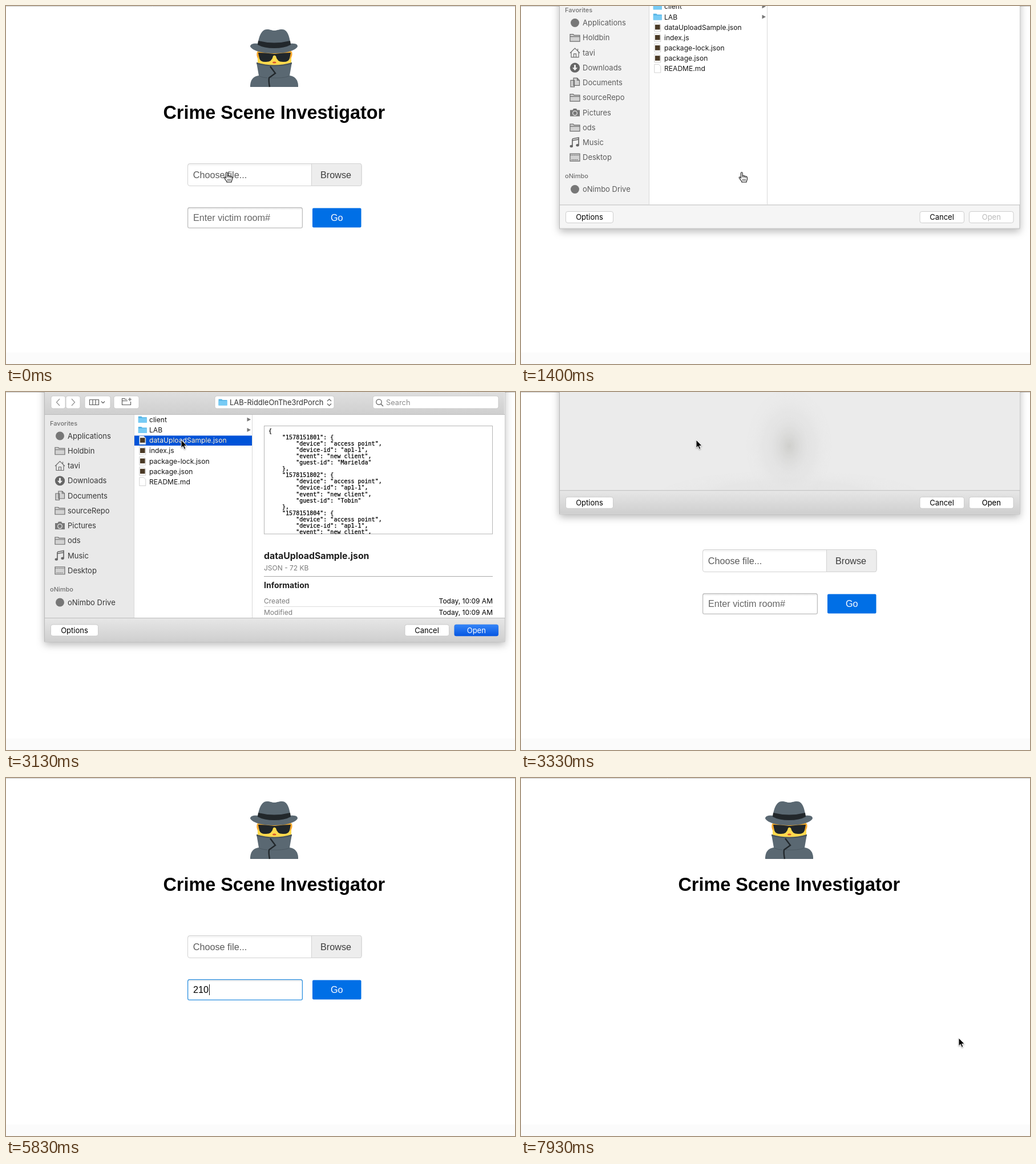
An HTML page for the animation above (8000 ms loop, 892 by 628 pixels).

```html
<!DOCTYPE html>
<html lang="en">
<head>
<meta charset="utf-8">
<title>Crime Scene Investigator</title>
<style>
html, body { margin: 0; width: 100%; height: 100%; overflow: hidden; background: #fff; }
svg { display: block; }
#stage { width: 100%; height: 100%; }
.page { font: 16.2px "Liberation Sans", Arial, sans-serif; }
.sheet { font: 13px Inter, Roboto, sans-serif; }
.sheet .file { font-size: 12.1px; }
.sheet .small { font-size: 11px; font-weight: 500; fill: #707070; }
.sheet .info { font-size: 12px; }
.sheet .head { font-weight: 700; fill: #1e1e1e; }
.sheet .grey { fill: #7b7b7b; }
.code { font: 10px "DejaVu Sans Mono", monospace; white-space: pre; stroke: #000; stroke-width: .25; }
.mid { text-anchor: middle; }
.end { text-anchor: end; }
.line { fill: none; stroke: #6c6c6c; stroke-width: 1.2; }
.pale { fill: #d2d2d2; }
.btn { fill: #fff; stroke: #c3c3c3; stroke-width: .8; }

/* one 8 s timeline: 1% = 80 ms */
.move { animation: 8s cubic-bezier(.364, 0, .636, 1) infinite; }
.flag { animation: 8s step-end infinite; opacity: 0; }

.sheet { animation-name: slide; }
@keyframes slide {
  0%, 13.57% { transform: translateY(-438px); visibility: hidden; }
  13.58% { transform: translateY(-438px); visibility: visible; }
  18.58%, 39.63% { transform: none; visibility: visible; }
  43.59% { transform: translateY(-438px); visibility: visible; }
  43.6%, 100% { transform: translateY(-438px); visibility: hidden; }
}
.still { animation-name: still; }
@keyframes still {
  0%, 39.63% { transform: translateY(0); }
  43.59%, 100% { transform: translateY(438px); }
}
.form { animation-name: fade; }
@keyframes fade { 0%, 83.1% { opacity: 1; } 88.1%, 100% { opacity: 0; } }
.field { animation-name: field; }
@keyframes field {
  0%, 51.25% { stroke: #bdbdbd; }
  53.4%, 60.38% { stroke: #d9252b; }
  62.9%, 76.6% { stroke: #2b8fe0; }
  78.4%, 100% { stroke: #bdbdbd; }
}
.cursor { animation-name: cursor; }
@keyframes cursor {
  0%, 26.25% { transform: translate(387px, 292.5px); }
  35.88%, 45.6% { transform: translate(307px, 84px); }
  51.1%, 73.25% { transform: translate(456px, 379px); }
  76.4%, 90.88% { transform: translate(577px, 372px); }
  98.6%, 100% { transform: translate(767px, 456px); }
}
.hand { animation-name: hand; }
@keyframes hand {
  0% { opacity: 1; } 19.5% { opacity: 0; }
  48.9% { opacity: 1; } 49.4% { opacity: 0; }
  75.2% { opacity: 1; } 88.75%, 100% { opacity: 0; }
}
.arrow { animation-name: arrow; }
@keyframes arrow {
  0% { opacity: 0; } 19.5% { opacity: 1; }
  48.9% { opacity: 0; } 49.4% { opacity: 1; } 50.1% { opacity: 0; }
  74.9% { opacity: 1; } 75.2% { opacity: 0; } 88.75%, 100% { opacity: 1; }
}
.beam { animation-name: beam; }
@keyframes beam {
  0% { opacity: 0; } 50.1% { opacity: 1; } 60.38% { opacity: 0; }
  73.25% { opacity: 1; } 74.9%, 100% { opacity: 0; }
}
.ring { animation-name: ring; }
@keyframes ring {
  0% { opacity: 0; } 3.75% { opacity: 1; } 10.38% { opacity: 0; }
  44% { opacity: 1; } 51.25%, 100% { opacity: 0; }
}
.hint { animation-name: hint; }
@keyframes hint { 0% { opacity: 1; } 60.38%, 100% { opacity: 0; } }
.key1 { animation-name: key1; }
@keyframes key1 { 0% { opacity: 0; } 60.38%, 100% { opacity: 1; } }
.key2 { animation-name: key2; }
@keyframes key2 { 0% { opacity: 0; } 65.37%, 100% { opacity: 1; } }
.key3 { animation-name: key3; }
@keyframes key3 { 0% { opacity: 0; } 67.12%, 100% { opacity: 1; } }
.caret { animation-name: caret; }
@keyframes caret {
  0% { opacity: 0; transform: none; }
  51.25% { opacity: 1; transform: none; }
  57.87% { opacity: 0; transform: none; }
  60.38% { opacity: 1; transform: translateX(9px); }
  65.37% { opacity: 1; transform: translateX(18px); }
  67.12% { opacity: 1; transform: translateX(27px); }
  73.37%, 100% { opacity: 0; transform: translateX(27px); }
}
.live { animation-name: live; }
@keyframes live { 0% { opacity: 0; } 19.5%, 100% { opacity: 1; } }
#side { animation: ink 8s step-end infinite; }
@keyframes ink { 0% { fill: #5c5c5c; } 19.5%, 100% { fill: #363636; } }
.pick { animation-name: pick; }
@keyframes pick { 0% { opacity: 0; } 37.12%, 100% { opacity: 1; } }
.preview { animation-name: preview; }
@keyframes preview { 0% { opacity: 0; } 37.87% { opacity: 1; } 39.6%, 100% { opacity: 0; } }
.blank { animation-name: blank; }
@keyframes blank { 0% { opacity: 0; } 39.6%, 100% { opacity: 1; } }
</style>
</head>
<body>
<svg id="stage" viewBox="0 0 892 628">
  <defs>
    <linearGradient id="bar" x2="0" y2="1"><stop stop-color="#e7e7e7"/><stop offset="1" stop-color="#cfcfcf"/></linearGradient>
    <linearGradient id="inset" x2="0" y2="1"><stop stop-color="#000" stop-opacity=".09"/><stop offset="1" stop-color="#000" stop-opacity="0"/></linearGradient>
    <linearGradient id="blue" x2="0" y2="1"><stop stop-color="#3585f7"/><stop offset="1" stop-color="#0657e2"/></linearGradient>
    <radialGradient id="core"><stop stop-color="#cfcfcc"/><stop offset="1" stop-color="#dcdcdc" stop-opacity="0"/></radialGradient>
    <radialGradient id="haze"><stop stop-color="#dedede"/><stop offset=".6" stop-color="#e3e3e3"/><stop offset="1" stop-color="#ebebeb" stop-opacity="0"/></radialGradient>
    <clipPath id="body"><path d="M68 0H874V396H68Z"/></clipPath>
    <clipPath id="box"><path d="M453 60H852V249H453Z"/></clipPath>
    <g id="folder"><path class="line pale" d="M-8.5-6H-3L-1.5-4.3H8.5V6.5H-8.5ZM-8.5-2H8.5"/></g>
    <g id="dot"><circle r="7.5" fill="#777"/></g>
    <g id="house"><path class="line" d="M-8.5.5 0-8 8.5.5M-6.5-1V8H6.5V-1M-2 8V2H2V8M5-7V-3.5"/></g>
    <g id="down"><circle r="8.6" fill="#666"/><path d="M-1.5-5H1.5V0H4.6L0 5-4.6 0H-1.5Z" fill="#eee"/></g>
    <g id="docs"><path class="line pale" d="M-7.5-4H-1V7.5H-7.5ZM-2.5-8H4L8-4V5H-2.5ZM4-8V-4H8"/></g>
    <g id="camera"><path d="M-8.5-4.5H-4L-2.5-7H2.5L4-4.5H8.5V6.5H-8.5Z" fill="#777"/><circle cy="1" r="3.8" fill="#777" stroke="#e5e5e5" stroke-width="1.3"/></g>
    <g id="note"><path d="M-4.5-6.5 6.5-8.5V4.5M-4.5-6V7M-4.5-3.5 6.5-5.5" fill="none" stroke="#666" stroke-width="1.7"/><ellipse cx="-6.2" cy="6.6" rx="2.7" ry="2.2" fill="#666"/><ellipse cx="4.6" cy="4.8" rx="2.7" ry="2.2" fill="#666"/></g>
    <g id="desk"><path class="line pale" d="M-8.5-6.5H8.5V6.5H-8.5Z"/><path class="line" d="M-8-4H8M-6 4H6" stroke-dasharray="2 1"/></g>
    <g id="dir"><path d="M-7.5-5.5H-2L-.5-4H7.5V5.5H-7.5Z" fill="#55b3e4"/><path d="M-7.5-2.6H7.5V5.5H-7.5Z" fill="#77cbf5"/></g>
    <g id="sheet"><path d="M-5.5-7.3H2L5.5-3.8V7.3H-5.5Z" fill="#fff" stroke="#c6c6c6" stroke-width=".8"/></g>
    <g id="src"><use href="#sheet"/><path d="M-4.3-4.3H4.3V4.3H-4.3Z" fill="#4a3a26"/></g>
    <path id="ibeam" d="M-3.5-7.5Q0-7.5 0-5 0-7.5 3.5-7.5M-3.5 7.5Q0 7.5 0 5 0 7.5 3.5 7.5M0-5.5V5.5M-2 3H2"/>
  </defs>

  <path d="M0 0H892V628H0Z" fill="#fff"/>
  <path d="M0 608H892V628H0Z" fill="#fbfbfb"/>

  <g class="page">
    <!-- detective -->
    <path d="M441 79H500V100L470 108 441 100Z" fill="#ffd94d"/>
    <path d="M440 80Q438 88 442 93L444 82ZM501 80Q503 88 498 93L496 82Z" fill="#f9a72b"/>
    <path d="M441 79Q470 86 500 79L498 84Q470 87 443 84Z" fill="#e9a52f"/>
    <path d="M442 82Q456 82 469 84H472Q485 82 499 82L497 92Q495 98 487 98 475 99 473 88 470 85 468 88 466 99 454 98 446 98 444 92Z" fill="#20262a"/>
    <ellipse cx="470.3" cy="99" rx="3.2" ry="1.6" fill="#d9582f"/>
    <path d="M428 142V139Q429 124 443 122L439 99Q455 105 470 105 486 105 501 99L497 122Q511 124 512 139V142Z" fill="#5a6872"/>
    <path d="M439 99Q470 108 501 99L500.5 102Q470 109 439.5 102Z" fill="#46525b"/>
    <path d="M444 123Q450 126 458 126M496 123Q487 127 464 126" fill="none" stroke="#4c5962"/>
    <path d="M463 106 472 118 461 126Q460 131 462 142" fill="none" stroke="#22282c" stroke-width="2.4"/>
    <path d="M441 69C443 53 448 41 457 41 464 41 465 43 470 43 475 43 477 41 484 41 493 41 497 53 499 69Z" fill="#5a6872"/>
    <path d="M428 71C428 66 435 65 442 66 455 73 486 73 498 66 505 65 511 66 511 71 507 79 490 83 470 83 450 83 432 79 428 71Z" fill="#5a6872"/>
    <path d="M442 61Q470 68 498 61L499 68Q488 74 470 74 452 74 441 68Z" fill="#22272b"/>

    <text x="275.4" y="198" font-size="32.4" font-weight="700">Crime Scene Investigator</text>

    <g class="form move">
      <rect class="ring flag" x="316.2" y="274.1" width="309.2" height="43.6" rx="5" fill="none" stroke="#0074d9" stroke-width="2"/>
      <rect x="318.5" y="276.5" width="304.5" height="39" rx="3.5" fill="#fff" stroke="#d2d2d2"/>
      <path d="M319 277H535V282H319Z" fill="url(#inset)" opacity=".6"/>
      <path d="M535.5 276.5H620Q623 276.5 623 279.5V312.5Q623 315.5 620 315.5H535.5Z" fill="#ededed" stroke="#d2d2d2"/>
      <text x="327.7" y="302" fill="#5a5a5a">Choose file...</text>
      <text x="551" y="302" fill="#3d3d3d">Browse</text>

      <rect class="field move" x="318.6" y="353.6" width="200.8" height="35.8" rx="3.2" fill="#fff" stroke-width="1.3"/>
      <path d="M319.5 354.3H518.5V358H319.5Z" fill="url(#inset)"/>
      <text class="hint flag" x="328" y="377" fill="#666">Enter victim room#</text>
      <text class="key1 flag" x="328" y="377">2</text>
      <text class="key2 flag" x="337" y="377">1</text>
      <text class="key3 flag" x="346" y="377">0</text>
      <path class="caret flag" d="M329.5 362V381" stroke="#111"/>
      <rect x="537" y="354.5" width="85.5" height="34" rx="2" fill="#006fe6"/>
      <text class="mid" x="579.7" y="377" fill="#fff">Go</text>
    </g>
  </g>

  <path d="M0 .5H892" stroke="#cacaca"/>

  <g class="sheet move">
    <path d="M67.5-20H874V438H67.5Z" fill="#f5f5f5" stroke="#b9b9b9" style="filter:drop-shadow(0 5px 7px rgba(0,0,0,.27))"/>
    <path d="M225-20H874V396H225Z" fill="#fff"/>
    <path d="M68-20H224V396H68Z" fill="#f2f2f2"/>
    <g class="live flag">
      <path d="M68 40H224V396H68Z" fill="#e9e9e9"/>
      <path d="M68 396H873.5V437.5H68Z" fill="url(#bar)"/>
    </g>
    <path d="M68-20H873.5V39H68Z" fill="url(#bar)"/>
    <path d="M68 39.5H874M68 396.5H874" stroke="#bcbcbc"/>
    <path d="M224.5 40V396M431.5 40V396" stroke="#d9d9d9"/>

    <g class="btn">
      <rect x="79" y="7" width="25" height="22" rx="3.5"/><rect x="105" y="7" width="25" height="22" rx="3.5"/>
      <rect x="138" y="7" width="45" height="22" rx="3.5"/><rect x="189" y="7" width="44" height="22" rx="3.5"/>
      <rect x="366" y="7" width="209" height="22" rx="3.5"/><rect x="643" y="7" width="220" height="22" rx="3.5"/>
    </g>
    <g fill="none" stroke="#5c5c5c" stroke-width="1.2">
      <path d="M94 12 88.5 18 94 24M115 12 120.5 18 115 24" stroke="#929292"/>
      <path d="M146.5 13.5H162.5V22.5H146.5ZM152 13.5V22.5M157 13.5V22.5M167 16.5 170 19.5 173 16.5"/>
      <path d="M212 13H209L207.5 11.5H203.5V22.5H218.5V17M203.5 15.5H213M214 13H220M217 10V16"/>
      <path d="M563 16 566.5 12.5 570 16M563 20.5 566.5 24 570 20.5"/>
      <circle cx="653.5" cy="17.5" r="4.7"/><path d="M657 21 661 25"/>
    </g>
    <use href="#dir" x="380" y="18"/>
    <text x="392" y="22.8" font-size="12.9" fill="#333">LAB-RiddleOnThe3rdPorch</text>
    <text x="666" y="23" font-size="12.8" fill="#8c8c8c">Search</text>

    <text class="small" x="77" y="58.5">Favorites</text>
    <text class="small" x="77" y="350">oNimbo</text>
    <g id="side"></g>

    <path class="pick flag" d="M225 76.5H431V94H225Z" fill="#0053d8"/>
    <g id="files" class="file"></g>

    <g class="preview flag">
      <rect x="452.5" y="59.5" width="400" height="189.5" fill="#fff" stroke="#b5b5b5"/>
      <g clip-path="url(#box)"><text id="json" class="code" y="60.4"></text></g>
      <text class="head" x="452" y="293" font-size="15.8">dataUploadSample.json</text>
      <text class="info grey" x="452" y="313">JSON - 72 KB</text>
      <path d="M452 323.5H853" stroke="#a9a9a9"/>
      <text class="head" x="452" y="344" font-size="14">Information</text>
      <text class="info grey" x="452" y="370.5">Created</text>
      <text class="info end" x="853" y="370.5">Today, 10:09 AM</text>
      <path d="M452 376.5H853" stroke="#dcdcdc"/>
      <text class="info grey" x="452" y="390.5">Modified</text>
      <text class="info end" x="853" y="390.5">Today, 10:09 AM</text>
    </g>

    <g class="blank flag" clip-path="url(#body)">
      <path d="M68 0H874V396H68Z" fill="#ebebeb"/>
      <g class="still move">
        <ellipse cx="470" cy="180" rx="230" ry="42" fill="url(#haze)" opacity=".5"/>
        <ellipse cx="470" cy="95" rx="75" ry="100" fill="url(#haze)" opacity=".75"/>
        <ellipse cx="470" cy="95" rx="36" ry="52" fill="url(#core)"/>
      </g>
    </g>

    <rect class="btn" x="78.5" y="408" width="83" height="20" rx="3.5"/>
    <rect class="btn" x="699" y="408" width="77.5" height="20" rx="3.5"/>
    <rect class="btn" x="785.5" y="408" width="77.5" height="20" rx="3.5"/>
    <text class="mid" x="120" y="422.5">Options</text>
    <text class="mid" x="737.5" y="422.5">Cancel</text>
    <text class="mid" x="824.3" y="422.5" fill="#b9b9b9">Open</text>
    <g class="preview flag">
      <rect x="785.5" y="407.8" width="77.5" height="20.4" rx="3.5" fill="url(#blue)"/>
      <text class="mid" x="824.3" y="422.5" fill="#fff">Open</text>
    </g>
    <text class="mid blank flag" x="824.3" y="422.5">Open</text>
  </g>

  <g class="cursor move" stroke-linejoin="round">
    <g class="hand flag" stroke="#111" stroke-width="1.1">
      <path fill="#fff" d="M-1.6 9.5V.8C-1.6-1.2 1.2-1.2 1.2.8V6C1.6 4.6 4 4.8 4 6.5 4.4 5.2 6.8 5.4 6.8 7.2 7.4 6 9.4 6.6 9.4 8.4V11C9.4 13 8 14 8 16.5H0C0 14-2.6 12.5-4.6 9.2-5.4 7.2-3.2 6.4-1.6 9.5Z"/>
      <path d="M1.2 6V8.5M4 6.5V9M6.8 7.2V9.3M1.7 11V14.3M3.9 11V14.3M6.1 11V14.3" fill="none" stroke-width=".9"/>
    </g>
    <path class="arrow flag" d="M0 0V14.2L3.2 11.2 5.5 16.4 7.9 15.4 5.7 10.4H10.2Z" fill="#000" stroke="#fff" style="filter:drop-shadow(0 1px 1px rgba(0,0,0,.35))"/>
    <g class="beam flag" fill="none">
      <use href="#ibeam" stroke="#fff" stroke-width="2.6"/>
      <use href="#ibeam" stroke="#111" stroke-width="1.2"/>
    </g>
  </g>
</svg>
<script>
const fill = (id, html) => { document.getElementById(id).innerHTML = html; };
const item = (icon, ix, tx, y, label, extra = '') =>
  `<use href="#${icon}" x="${ix}" y="${y}"/><text x="${tx}" y="${y + 4.6}" ${extra}>${label}</text>`;

const places = [
  ['dot', 'Applications'], ['folder', 'Holdbin'], ['house', 'tavi'], ['down', 'Downloads'],
  ['docs', 'Documents'], ['folder', 'sourceRepo'], ['camera', 'Pictures'], ['folder', 'ods'],
  ['note', 'Music'], ['desk', 'Desktop']
];
fill('side', places.map(([icon, name], i) => item(icon, 94.5, 108, 77 + i * 26.25, name)).join('') +
  item('dot', 94.5, 108, 369, 'oNimbo Drive'));

const files = [
  ['dir', 'client'], ['dir', 'LAB'], ['src', 'dataUploadSample.json'], ['src', 'index.js'],
  ['src', 'package-lock.json'], ['src', 'package.json'], ['sheet', 'README.md']
];
fill('files', files.map(([icon, name], i) => {
  const y = 48.3 + i * 18.15;
  const tip = icon === 'dir' ? `<path d="M422.5 ${y - 3.5}l6.5 3.5-6.5 3.5z" fill="#777"/>` : '';
  const white = i === 2 ? `<text class="pick flag" x="251" y="${y + 4.6}" fill="#fff">${name}</text>` : '';
  return item(icon, 239.3, 251, y, name, 'fill="#161616"') + tip + white;
}).join(''));

const entry = (id, guest) => [
  `    "${id}": {`, '        "device": "access point",', '        "device-id": "ap1-1",',
  '        "event": "new client",', `        "guest-id": "${guest}"`, '    },'
];
const lines = ['{', ...entry(1578151801, 'Marielda'), ...entry(1578151802, 'Tobin'), ...entry(1578151804, 'Odile')];
fill('json', lines.slice(0, 17).map(s => `<tspan x="460" dy="11.1">${s}</tspan>`).join(''));
</script>
</body>
</html>
```
